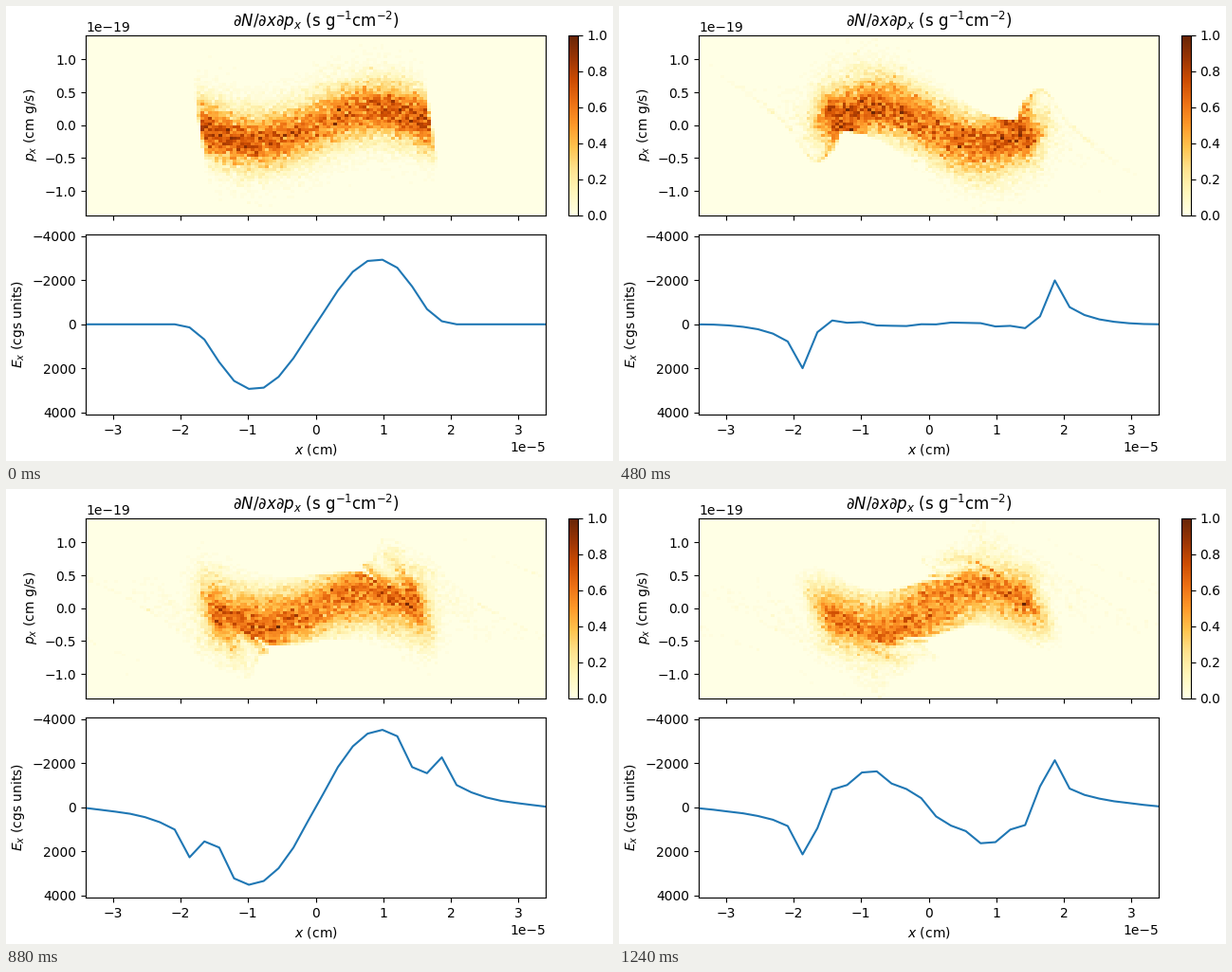
A matplotlib script for the animation above (1280 ms loop, 640 px wide and 480 px high).

```python
import numpy as np
import matplotlib.pyplot as plt
from matplotlib.animation import FuncAnimation

# One-dimensional electron slab over fixed ions, solved with a small
# particle-in-cell model. Lengths are in 1e-5 cm, momenta in 1e-19 cm g/s,
# times in animation frames.
W, H, DPI = 640, 480, 100
FRAMES, INTERVAL, SUBSTEPS = 32, 40, 6
HALF, EDGE, CELLS = 3.4, 1.7, 32
DX = 2 * HALF / CELLS
P_MAX, E_MAX = 1.369, 4086
DRIFT = 0.147           # displacement per frame per unit momentum
KICK = 6.43e-5          # momentum per frame per unit field
CHARGE = 7.51e4         # field of a unit length of bare ions
SPREAD, SHIFT = 0.28, 0.059
PAIRS, SHOWN = 50000, 0.33


def locate(x, offset=0.0):
    """Cell index and fraction of each position."""
    s = (x + HALF) / DX - offset
    j = np.floor(s).astype(int)
    return j, s - j


def density(x):
    j, w = locate(x)
    n = np.bincount(j % CELLS, 1 - w, CELLS)
    n += np.bincount((j + 1) % CELLS, w, CELLS)
    return n * 2 * EDGE / (len(x) * DX)


def solve_field(x, ions):
    e = CHARGE * DX * np.cumsum(density(x) - ions)
    return e - e.mean()


def force(x, ions):
    e = solve_field(x, ions)
    j, w = locate(x, 0.5)
    return -KICK * (e[j % CELLS] * (1 - w) + e[(j + 1) % CELLS] * w)


def simulate():
    """Phase-space maps and fields, one of each per frame."""
    rng = np.random.default_rng(7)
    x = ((np.arange(PAIRS) + 0.5) / PAIRS * 2 - 1) * EDGE
    p = rng.normal(0, SPREAD, PAIRS)
    # Mirrored pairs keep the field exactly antisymmetric.
    x, p = np.concatenate([x, -x]), np.concatenate([p, -p])
    shown = rng.random(len(x)) < SHOWN
    ions = density(x)
    x = x + SHIFT * np.sin(np.pi * x / EDGE)

    h = 1 / SUBSTEPS
    f = force(x, ions)
    maps, fields = [], []
    for _ in range(FRAMES):
        for _ in range(SUBSTEPS):
            p += f * h / 2
            x = (x - DRIFT * p * h + HALF) % (2 * HALF) - HALF
            f = force(x, ions)
            p += f * h / 2
        counts = np.histogram2d(p[shown], x[shown], bins=(64, 128),
                                range=[[-P_MAX, P_MAX], [-HALF, HALF]])[0]
        maps.append(counts / counts.max())
        fields.append(solve_field(x, ions))
    return maps, fields


def add_box(left, top, right, bottom, **kw):
    return fig.add_axes([left / W, 1 - bottom / H,
                         (right - left) / W, (bottom - top) / H], **kw)


maps, fields = simulate()

fig = plt.figure(figsize=(W / DPI, H / DPI), dpi=DPI)
phase = add_box(84.02, 30.8, 569.02, 220.8)
lower = add_box(84.02, 240.8, 569.02, 430.8, sharex=phase)
bar = add_box(593.2, 30.8, 602.7, 220.8)

xm, pm = HALF * 1e-5, P_MAX * 1e-19
image = phase.imshow(maps[0], origin="lower", aspect="auto", cmap="YlOrBr",
                     interpolation="nearest", vmin=0, vmax=1,
                     extent=[-xm, xm, -pm, pm])
phase.set_title(r"$\partial N/\partial x\partial p_x$ (s g$^{-1}$cm$^{-2}$)")
phase.set_ylabel(r"$p_x$ (cm g/s)")
phase.tick_params(labelbottom=False)
phase.xaxis.get_offset_text().set_visible(False)
fig.colorbar(image, cax=bar)

line, = lower.plot(np.linspace(-xm, xm, CELLS), fields[0])
lower.set_xlim(-xm, xm)
lower.set_ylim(E_MAX, -E_MAX)
lower.set_xlabel(r"$x$ (cm)")
lower.set_ylabel(r"$E_x$ (cgs units)")


def draw(i):
    image.set_data(maps[i])
    line.set_ydata(fields[i])
    return image, line


anim = FuncAnimation(fig, draw, frames=FRAMES, interval=INTERVAL,
                     repeat=True, repeat_delay=0)
plt.show()
```
